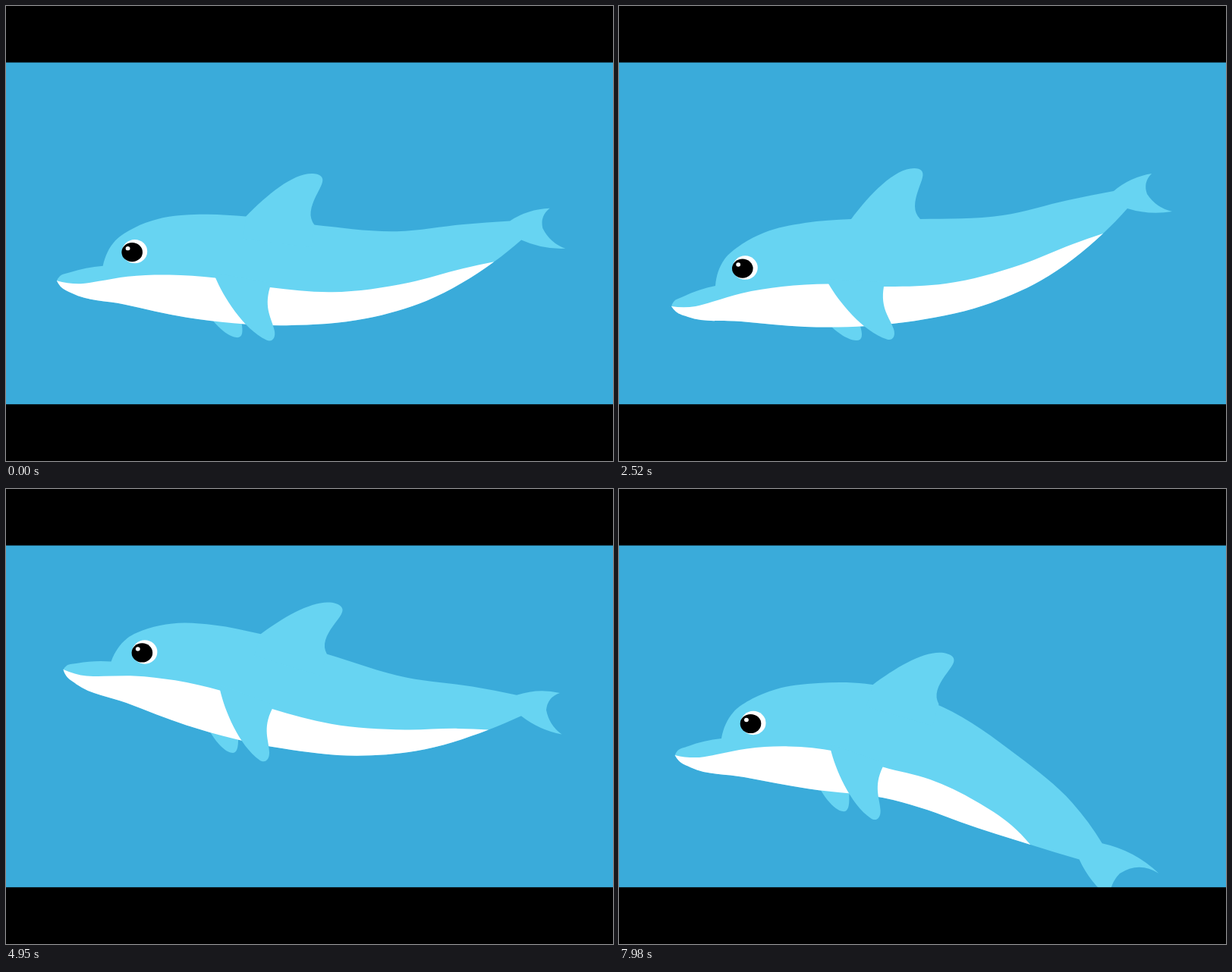
Recreate the animation shown at these times as an HTML page with a canvas. Size 800 by 600 pixels, loop 8000 ms.

```html
<!DOCTYPE html>
<html lang="en">
<head>
<meta charset="utf-8">
<title>Swimming dolphin</title>
<style>
  html, body { margin: 0; width: 100%; height: 100%; overflow: hidden; background: #000; }
  canvas { display: block; width: 100vw; height: 100vh; }
</style>
</head>
<body>
<canvas id="stage" width="800" height="600"></canvas>
<script>
const ctx = document.getElementById('stage').getContext('2d');
const LOOP = 8000, CYCLE = 3360, BEAT = 840, STEP = 30;
const SEA = '#3aabda', SKIN = '#67d4f2';

// Outline at rest, relative to the base of the dorsal fin.
const beak = [[-282, 115], [-279, 109], [-266, 102], [-224, 88]];
const back = [[-224, 88], [-212, 53], [-189, 33], [-160, 18], [-106, 5],
  [-45, 0], [45, 0], [155, -5], [241, -25], [301, -37]];
const fluke = [[301, -37], [351, -60], [345, -33], [378, -10], [319, -14]];
const underside = [[319, -14], [287, 19], [205, 81], [129, 114], [26, 136],
  [-106, 142], [-190, 135], [-260, 129], [-276, 122], [-282, 115]];
const bellyLine = [[-282, 115], [-250, 115], [-228, 109], [-190, 98], [-136, 89],
  [-75, 85.5], [-2, 89], [80, 85], [179, 60], [247, 33], [287, 19]];
const eye = [-185, 64];
const dorsal = new Path2D('M-45,0C-20,-33 12,-67 38,-67C47,-67 51,-63 49,-55C47,-46 39,-31 39,-17Q39,-7 46,0V30H-45Z');
const nearFlipper = new Path2D('M-75,85C-62,108 -30,148 2,158.5C10,161 14,154 11,145C6,130 -7,118 -2,89V83L-75,79Z');
const farFlipper = new Path2D('M-90,120C-75,142 -52,160 -38,160C-30,160 -29,153 -34,138L-40,110Z');

// Eases between [time, value] keys and holds the last value to the end.
function eased(keys, t) {
  const next = keys.findIndex(key => key[0] > t);
  if (next <= 0) return keys[next === 0 ? 0 : keys.length - 1][1];
  const [[t0, a], [t1, b]] = [keys[next - 1], keys[next]];
  const u = (t - t0) / (t1 - t0);
  return a + (b - a) * u * u * (3 - 2 * u);
}

// Steady tail beats, with one leap in every cycle.
const tailBeat = t => (1 - Math.cos(2 * Math.PI * t / BEAT)) / 2;
const leap = t => eased([[840, 283], [1260, 315], [1350, 315], [1730, 162], [2240, 195], [2480, 281], [2940, 283]], t);
const pitch = t => eased([[840, 7.1], [1260, 16.1], [1590, 16.8], [2450, 0], [2520, 0], [2940, 7.1]], t);

// Arches the body: the tail sweeps down along a curve, the head nods.
function arch([x, y], bend) {
  const sag = 11 * bend * Math.exp(-((x / 90) ** 2) - ((y - 90) / 35) ** 2);
  if (x < -40) {
    const nod = 0.19 * bend;
    return [x + nod * (y - 50), y - nod * (x + 40) + sag];
  }
  const u = Math.min(1, Math.max(0, (x - 20) / 290));
  const slope = 1.6 * u * bend, offset = y - 50 + 88 * u;
  const drop = 162 * u ** 1.8 + 0.6 * Math.max(0, x - 310);
  return [x - slope * offset, y + bend * drop - 0.13 * slope * slope * offset + sag];
}

// Adds a smooth curve through the points to the path, from index `first` on.
function smooth(path, pts, first = 0) {
  const n = pts.length - 1, len = [], dir = [];
  for (let i = 0; i < n; i++) {
    const dx = pts[i + 1][0] - pts[i][0], dy = pts[i + 1][1] - pts[i][1];
    len[i] = Math.hypot(dx, dy);
    dir[i] = [dx / len[i], dy / len[i]];
  }
  const inner = (i, k) => (dir[i - 1][k] * len[i] + dir[i][k] * len[i - 1]) / (len[i - 1] + len[i]);
  const tangent = (i, k) =>
    i === 0 ? 2 * dir[0][k] - inner(1, k) :
    i === n ? 2 * dir[n - 1][k] - inner(n - 1, k) : inner(i, k);
  for (let i = first; i < n; i++) {
    const h = len[i] / 3, p = pts[i], q = pts[i + 1];
    path.bezierCurveTo(
      p[0] + tangent(i, 0) * h, p[1] + tangent(i, 1) * h,
      q[0] - tangent(i + 1, 0) * h, q[1] - tangent(i + 1, 1) * h, q[0], q[1]);
  }
}

function bow(path, p, q, bulge) {
  const dx = q[0] - p[0], dy = q[1] - p[1];
  path.quadraticCurveTo(
    (p[0] + q[0]) / 2 + dy * bulge * 2, (p[1] + q[1]) / 2 - dx * bulge * 2, q[0], q[1]);
}

function fill(path, color) {
  ctx.fillStyle = color;
  ctx.fill(path);
}

function oval(x, y, rx, ry, color) {
  const path = new Path2D();
  path.ellipse(x, y, rx, ry, 0, 0, Math.PI * 2);
  fill(path, color);
}

function drawDolphin(t) {
  const bend = tailBeat(t), deg = pitch(t), angle = deg * Math.PI / 180;
  const pose = pts => pts.map(p => arch(p, bend));
  const lower = pose(underside), tail = pose(fluke);

  const body = new Path2D();
  body.moveTo(...lower[lower.length - 1]);
  smooth(body, pose(beak));
  smooth(body, pose(back));
  [0.07, -0.16, -0.1, 0.06].forEach((bulge, i) => bow(body, tail[i], tail[i + 1], bulge));
  smooth(body, lower);

  const belly = new Path2D();
  belly.moveTo(...lower[lower.length - 1]);
  smooth(belly, pose(bellyLine));
  smooth(belly, lower, 1);

  const flipper = shape => {
    ctx.save();
    ctx.translate(0, 11 * bend);
    fill(shape, SKIN);
    ctx.restore();
  };

  ctx.save();
  ctx.translate(351 + 1.2 * deg + 0.027 * deg * deg, leap(t) - 44 * bend);
  ctx.rotate(angle);
  flipper(farFlipper);
  fill(body, SKIN);
  fill(dorsal, SKIN);
  fill(belly, '#fff');
  flipper(nearFlipper);
  ctx.translate(...arch(eye, bend));
  ctx.rotate(-angle);
  oval(0.3, 0, 16.5, 15.7, '#fff');
  oval(-3.2, 1, 13.8, 12.6, '#000');
  oval(-8.8, -4, 2.9, 2.7, '#fff');
  ctx.restore();
}

function draw(time) {
  const t = Math.floor((time % LOOP) / STEP) * STEP % CYCLE;
  ctx.fillStyle = SEA;
  ctx.fillRect(0, 0, 800, 600);
  drawDolphin(t);
  ctx.fillStyle = '#000';
  ctx.fillRect(0, 0, 800, 74.5);
  ctx.fillRect(0, 525.2, 800, 75);
}

const start = performance.now();
function tick() {
  draw(performance.now() - start);
  requestAnimationFrame(tick);
}
tick();
</script>
</body>
</html>
```
